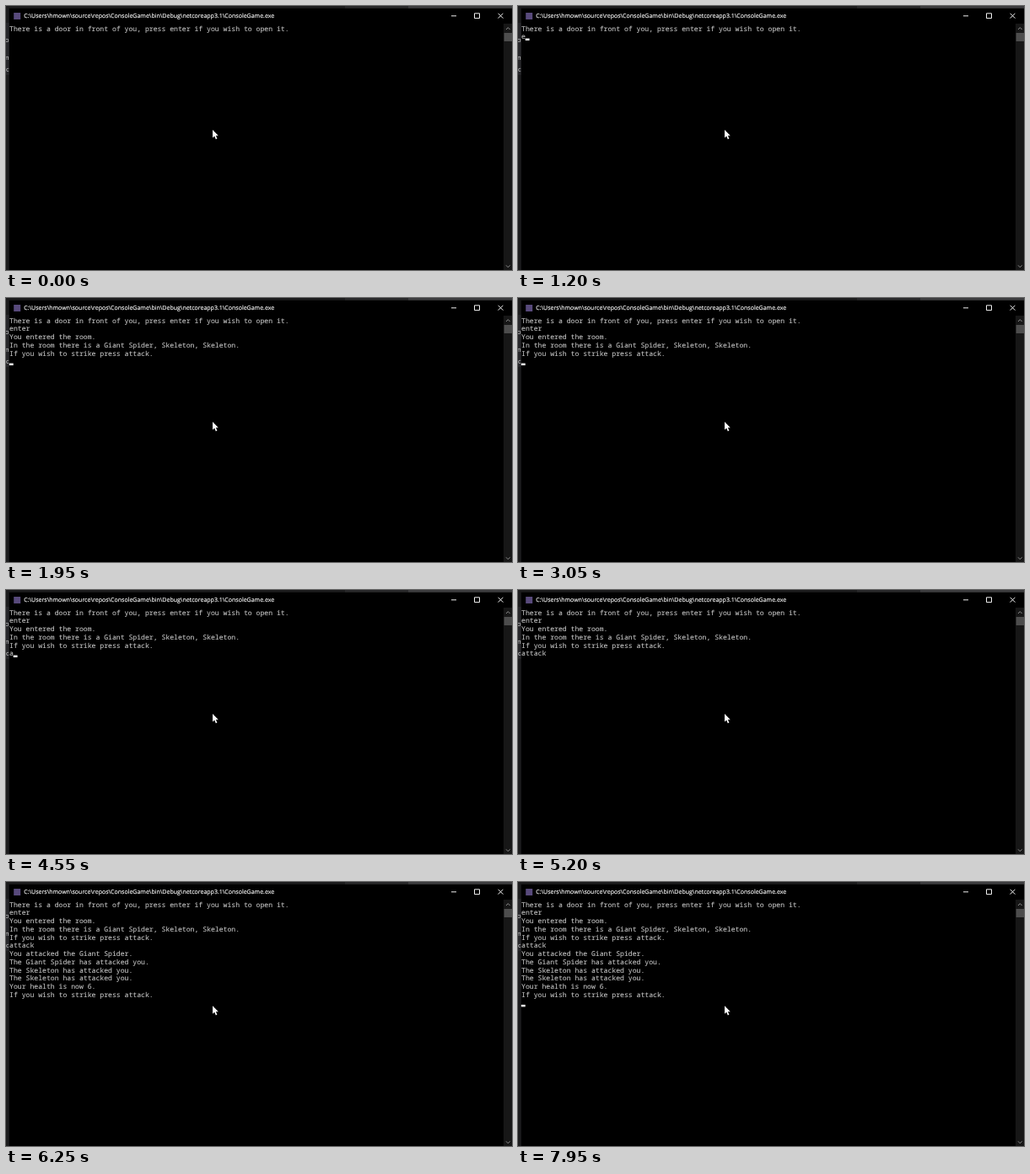
Recreate the animation shown at these times as an HTML page. Size 600 by 314 pixels, loop 8000 ms.

```html
<!DOCTYPE html>
<html lang="en">
<head>
<meta charset="utf-8">
<title>Console game</title>
<style>
  html, body { margin: 0; width: 100%; height: 100%; overflow: hidden; background: #000; }
  svg { display: block; width: 600px; height: 314px; }
  text { text-rendering: geometricPrecision; white-space: pre; }
  .title { font: 7.03px "Open Sans", "Noto Sans", sans-serif; fill: #fff; stroke: #fff; stroke-width: .14; }
  .behind { font: 500 7.6px "Open Sans", "Noto Sans", sans-serif; fill: #dcdcdc; }
  #lines { font: 8.13px "Noto Sans Mono", "DejaVu Sans Mono", monospace; fill: #c8c8c8; stroke: #c8c8c8; stroke-width: .08; }
  .icon { fill: none; stroke: #f0f0f0; stroke-width: 1; }
  .arrow { fill: none; stroke: #8a8a8a; stroke-width: 1; }
</style>
</head>
<body>
<svg viewBox="0 0 600 314">
  <!-- editor behind the window -->
  <rect width="600" height="314" fill="#1c1c1d"/>
  <rect x="402" width="75" height="3" fill="#28282a"/>
  <rect x="477" width="123" height="3" fill="#3c3c3e"/>
  <rect y="20" width="4" height="62" fill="#27272a"/>
  <g class="behind">
    <text x="-1" y="43">o</text>
    <text x="-3.4" y="64.4">m</text>
    <text x="0" y="77.8">c</text>
  </g>

  <!-- window -->
  <rect x="3.8" y="2.8" width="596.2" height="311.2" fill="#000"/>
  <rect x="9.2" y="8" width="8" height="8" fill="#584a7c"/>
  <text class="title" x="21.2" y="14.3">C:\Users\hmown\source\repos\ConsoleGame\bin\Debug\netcoreapp3.1\ConsoleGame.exe</text>
  <path class="icon" d="M528 11.8h6M555.5 8.8h6v5.8h-6zM583.6 8.8l5.8 5.8M589.4 8.8l-5.8 5.8"/>

  <!-- scroll bar -->
  <rect x="590" y="21" width="10" height="293" fill="#171717"/>
  <rect x="590.6" y="32" width="9.4" height="10" fill="#4d4d4d"/>
  <path class="arrow" d="M593 28l2.3-2.4 2.3 2.4M593 308.4l2.3 2.4 2.3-2.4"/>

  <g id="lines"></g>
  <rect id="caret" width="4.9" height="2.5" fill="#f2f2f2"/>
  <path d="M245 147.2v9.6l2.2-2 1.6 3.6 1.6-.7-1.6-3.5h3z" fill="#fff"/>
</svg>
<script>
const LOOP = 8000, LEFT = 4, CELL = 4.88, ROW = 9.76;

// Each entry: text and the time it is printed, or one time per typed letter.
const script = [
  ["There is a door in front of you, press enter if you wish to open it.", 0],
  ["enter", [1200, 1400, 1450, 1650, 1800]],
  ["You entered the room.", 1950],
  ["In the room there is a Giant Spider, Skeleton, Skeleton.", 1950],
  ["If you wish to strike press attack.", 1950],
  ["attack", [4550, 4600, 4700, 4750, 5100, 5200]],
  ["You attacked the Giant Spider.", 5450],
  ["The Giant Spider has attacked you.", 5450],
  ["The Skeleton has attacked you.", 5450],
  ["The Skeleton has attacked you.", 5450],
  ["Your health is now 6.", 5450],
  ["If you wish to strike press attack.", 5450]
];

// The caret starts hidden and flips at each of these times.
const flips = [400, 950, 1200, 2500, 3050, 3600, 4100, 4850, 5450, 6250, 6750, 7300, 7850];

const passed = (times, t) => times.filter(x => x <= t).length;
const group = document.getElementById("lines");
const caret = document.getElementById("caret");

const lines = script.map(([text, when], i) => {
  const node = document.createElementNS("http://www.w3.org/2000/svg", "text");
  node.setAttribute("x", LEFT);
  node.setAttribute("y", 29.5 + i * ROW);
  group.append(node);
  return { node, text, when };
});

function shownLength({ text, when }, t) {
  if (Array.isArray(when)) return passed(when, t);
  return t >= when ? text.length : 0;
}

function draw(t) {
  let row = 0, col = 0;
  lines.forEach((line, i) => {
    const n = shownLength(line, t);
    const part = line.text.slice(0, n);
    if (line.node.textContent !== part) line.node.textContent = part;
    if (!n) return;
    const typed = Array.isArray(line.when);
    row = typed ? i : i + 1;
    col = typed ? n : 0;
  });
  caret.setAttribute("x", LEFT - .2 + col * CELL);
  caret.setAttribute("y", 28.8 + row * ROW);
  caret.setAttribute("visibility", passed(flips, t) % 2 ? "visible" : "hidden");
}

function tick() {
  draw(performance.now() % LOOP);
  requestAnimationFrame(tick);
}
tick();
</script>
</body>
</html>
```
